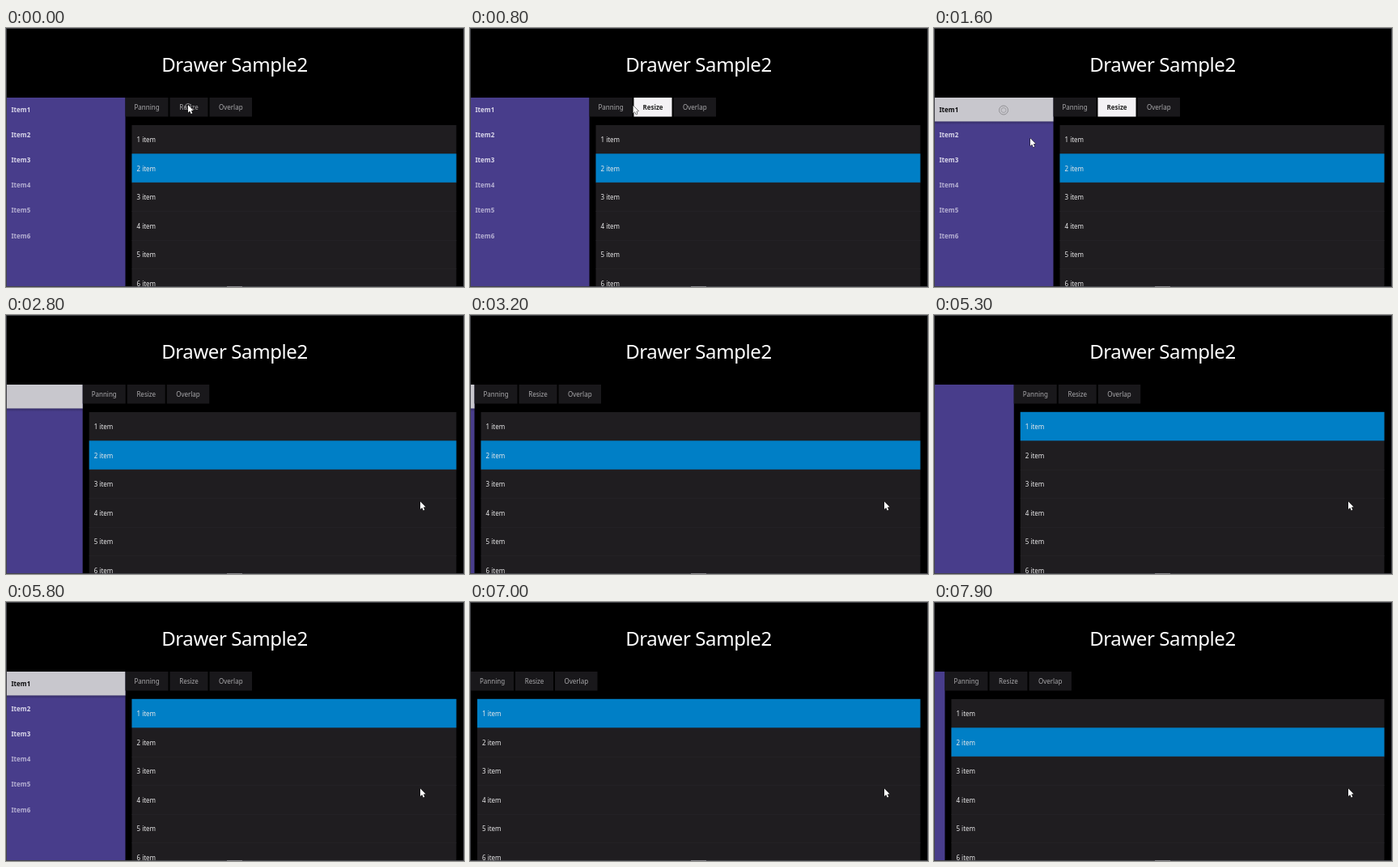
Animation, 566 px wide and 320 px high, one loop 8 s. Source, as an HTML page with a canvas:

```html
<!DOCTYPE html>
<html lang="en">
<head>
<meta charset="utf-8">
<title>Drawer sample</title>
<style>
html, body { margin: 0; width: 566px; height: 320px; overflow: hidden; background: #000; }
canvas { display: block; }
</style>
</head>
<body>
<canvas id="stage" width="566" height="320"></canvas>
<script>
const c = document.getElementById('stage').getContext('2d');
const LOOP = 8000, OPEN = 146.5;
const FONT = '"Noto Sans", "Open Sans", sans-serif';
const clamp = v => Math.max(0, Math.min(1, v));
const ramp = (t, from, to) => clamp((t - from) / (to - from));
const easeOut = p => 1 - (1 - p) ** 3;
const mix = (a, b, p) => a + (b - a) * p;

// start, duration, target offset
const slides = [[2700, 730, 0], [5080, 720, OPEN], [6100, 600, 0], [7880, 720, OPEN]];
// time, x, y of the pointer tip
const path = [[0, 225, 95], [700, 225, 95], [1300, 86, 100], [1500, 86, 100],
  [1600, 118, 136], [2000, 512, 230.5], [LOOP, 512, 230.5]];

function drawerOffset(t) {
  return slides.reduce((o, [start, len, to]) =>
    mix(o, to, easeOut(clamp((t - start) / len))), OPEN);
}

function pointerAt(t) {
  const i = path.findIndex(k => k[0] > t);
  const a = path[i - 1], b = path[i], p = ramp(t, a[0], b[0]);
  return [mix(a[1], b[1], p), mix(a[2], b[2], p)];
}

function box(x, y, w, h, color) {
  c.fillStyle = color;
  c.fillRect(x, y, w, h);
}

function text(str, x, y, color, weight = 400, size = 8) {
  c.font = `${weight} ${size}px ${FONT}`;
  c.fillStyle = color;
  c.fillText(str, x, y);
}

function shadow(x, y, w, h, alpha) {
  const g = c.createLinearGradient(0, y, 0, y + h);
  g.addColorStop(0, `rgba(0,0,0,${alpha})`);
  g.addColorStop(1, 'rgba(0,0,0,0)');
  box(x, y, w, h, g);
}

function drawTitle() {
  c.textAlign = 'center';
  c.letterSpacing = '-0.4px';
  text('Drawer Sample2', 282.5, 54, '#fff', 400, 24);
  c.letterSpacing = '0px';
}

function drawDrawer(t, o) {
  const x = 1 + o - OPEN;
  box(x, 86, OPEN, 234, '#483d8b');
  const focus = t < 1300 ? 0 : t < 5000 ? 1 : t < 5500 ? 0 : t < 6000 ? 1 : t < 7200 ? 2 : 0;
  const glow = t < 5000 ? ramp(t, 1300, 1500) : 1;
  c.textAlign = 'left';
  for (let i = 1; i <= 6; i++) {
    const y = 86 + (i - 1) * 31.1, on = i === focus;
    if (on) {
      c.globalAlpha = glow;
      box(x, y, OPEN, 29.5, '#c8c7cd');
      shadow(x, y + 29.5, OPEN, 4, 0.25);
      c.globalAlpha = 1;
    }
    const color = on && glow > 0.5 ? '#0a0a0c' : i < 4 ? '#dad7ea' : '#b5afd2';
    text('Item' + i, x + 5.5, y + 18, color, 600);
  }
}

function drawButtons(t, o) {
  const lit = ramp(t, 100, 500) - ramp(t, 1650, 1850);
  c.textAlign = 'center';
  [['Panning', 1, 53], ['Resize', 56, 47], ['Overlap', 105, 52.5]].forEach(([label, x, w], i) => {
    const glow = i === 1 ? lit : 0;
    box(x + o, 86, w, 23.5, '#19181b');
    if (glow) box(x + o, 86, w, 23.5, `rgba(244,242,245,${glow})`);
    text(label, x + o + w / 2, 101, glow > 0.5 ? '#222' : '#a9a8ab', glow > 0.5 ? 600 : 400);
  });
}

function drawList(t, o) {
  const x = 9 + o, w = 556.5 - x, row = 35.5;
  const selected = t >= 5000 && t < 7800 ? 1 : 2;
  const focus = selected === 2 ? [1, ramp(t, 4150, 4850)] : [2, ramp(t, 7250, 7600)];
  const active = selected === 1 || t < 5000;
  box(x, 120, w, 200, '#1f1d20');
  c.textAlign = 'left';
  for (let i = 1; i <= 6; i++) {
    const y = 119.8 + (i - 1) * row;
    if (i > 2) box(x, Math.round(y), w, 1, '#232125');
    if (i === selected) box(x, y, w, row, '#007fc6');
  }
  if (active && focus[1]) {
    const y = 119.8 + (focus[0] - 1) * row;
    box(x, y, w, row, `rgba(255,255,255,${0.065 * focus[1]})`);
    shadow(x, y + row, w, 6, 0.22 * focus[1]);
  }
  for (let i = 1; i <= 6; i++) text(i + ' item', x + 6, 141 + (i - 1) * row, '#e9e9ea');
}

function ring(x, y, r, color) {
  c.strokeStyle = color;
  c.lineWidth = 1;
  c.beginPath();
  c.arc(x, y, r, 0, 7);
  c.stroke();
}

function drawPointer(t) {
  if (t < 200) ring(225, 97, 3.5, '#8b8a8d');
  if (t >= 1300 && t < 1700) {
    ring(86, 101.5, 5.5, '#929195');
    ring(86, 101.5, 3, '#a3a2a6');
  }
  const [x, y] = pointerAt(t);
  c.save();
  c.translate(x, y);
  c.beginPath();
  [[0, 0], [0, 9.5], [2.2, 7.5], [3.7, 11], [5.3, 10.3], [3.8, 7], [6.6, 6.8]]
    .forEach(p => c.lineTo(...p));
  c.closePath();
  c.strokeStyle = '#111';
  c.lineWidth = 1;
  c.stroke();
  c.fillStyle = '#fff';
  c.fill();
  c.restore();
}

function drawFrame() {
  c.strokeStyle = '#45464b';
  c.lineWidth = 1;
  c.strokeRect(0.5, 0.5, 565, 319);
  box(273, 319, 19, 1, '#85868a');
}

function draw(now) {
  const t = now % LOOP, o = drawerOffset(t);
  box(0, 0, 566, 320, '#000');
  drawTitle();
  drawDrawer(t, o);
  drawButtons(t, o);
  drawList(t, o);
  drawPointer(t);
  drawFrame();
  requestAnimationFrame(draw);
}
requestAnimationFrame(draw);
</script>
</body>
</html>
```
